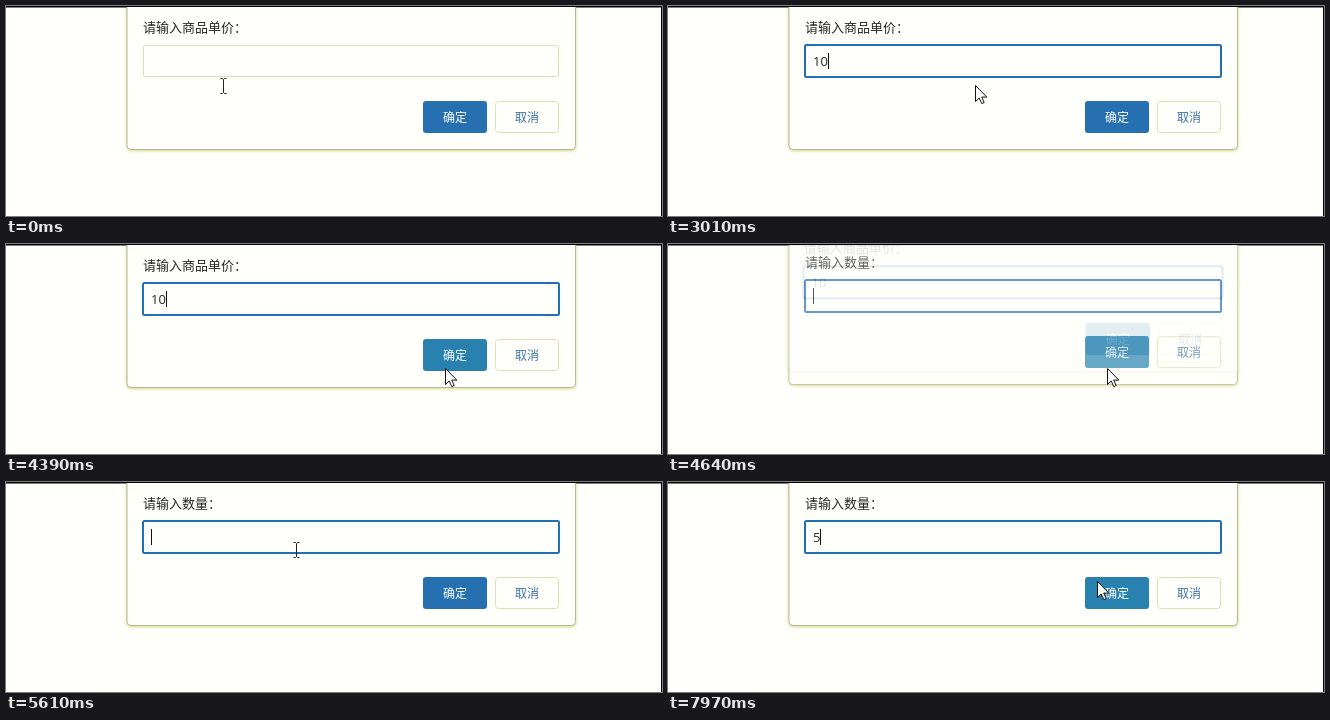
Write an HTML page that moves like this. It is 656 px wide and 210 px high and loops after 8000 ms.

```html
<!DOCTYPE html>
<html lang="zh-CN">
<head>
<meta charset="utf-8">
<title>Prompt dialogs</title>
<style>
  html, body { margin: 0; width: 100%; height: 100%; overflow: hidden; background: #fffffc; }
  svg { display: block; }
  text { font-family: "Noto Sans CJK SC", "Noto Sans CJK", sans-serif; font-size: 13px; fill: #262622; }
  text.value { font-family: "Open Sans", "Noto Sans", sans-serif; }
  text.label { font-size: 12px; text-anchor: middle; }
  .panel { fill: #fffffc; stroke: #b6b79c; filter: drop-shadow(0 1px 1.5px rgba(185, 185, 40, .6)); }
  .outline { fill: none; stroke: #dde0b4; }
  .ring { fill: none; stroke: #2270b4; stroke-width: 2; }
</style>
</head>
<body>
<svg width="656" height="210" viewBox="0 0 656 210">
  <rect width="656" height="1.5"/>
  <rect x="655" width="1" height="210"/>
  <g id="dialogs"></g>
  <rect width="656" height="1"/>
  <path id="arrow" d="M.5 .5V16.5L4.2 13L6.8 18.6L9.2 17.5L6.7 12.1H11.8Z" fill="#fff" stroke="#111"/>
  <path id="beam" d="M-3 .5H-1L0 1.5L1 .5H3M0 1.5V14.5M-3 15.5H-1L0 14.5L1 15.5H3" fill="none" stroke="#222"/>
</svg>
<script>
const LOOP = 8000, BLINK = 530;
const $ = id => document.getElementById(id);
const clamp = v => Math.max(0, Math.min(1, v));
const ramp = (t, from, to) => clamp((t - from) / (to - from));
const smooth = p => p * p * (3 - 2 * p);

// Pointer hot spot: time, x, y
const pointerPath = [
  [40, 217, 72], [240, 229, 64],
  [2600, 229, 64], [2800, 256, 68], [3010, 307, 79], [3380, 420, 112], [3700, 436, 121], [4000, 439, 124],
  [4900, 439, 124], [5060, 415, 115], [5340, 320, 76], [5560, 290, 60],
  [7160, 290, 60], [7400, 315, 67], [7700, 388, 88], [7930, 429, 99]
];

function pointerAt(t) {
  const next = pointerPath.findIndex(point => point[0] > t);
  if (next === 0) return pointerPath[0].slice(1);
  if (next < 0) return pointerPath.at(-1).slice(1);
  const [t0, x0, y0] = pointerPath[next - 1], [t1, x1, y1] = pointerPath[next];
  const p = (t - t0) / (t1 - t0);
  return [x0 + (x1 - x0) * p, y0 + (y1 - y0) * p];
}

function createDialog(title) {
  const group = document.createElementNS("http://www.w3.org/2000/svg", "g");
  group.innerHTML = `
    <path class="panel" d="M121 -30H569.5V139.5Q569.5 143.5 565.5 143.5H125Q121 143.5 121 139.5Z"/>
    <text x="137" y="26">${title}</text>
    <rect class="outline" x="137.5" y="39.5" width="415" height="31" rx="1"/>
    <rect class="ring" x="137" y="39" width="416" height="32" rx="1.5"/>
    <text class="value" x="145" y="60"></text>
    <rect class="caret" y="47" width="1" height="16" fill="#111"/>
    <rect class="ok" x="417" y="95" width="64" height="32" rx="3"/>
    <text class="label" x="449" y="116" style="fill:#fff">确定</text>
    <rect class="outline" x="489.5" y="95.5" width="63" height="31" rx="3"/>
    <text class="label" x="521" y="116" style="fill:#3b73a8">取消</text>`;
  // Later dialogs lie beneath the one being dismissed.
  $("dialogs").prepend(group);
  const part = name => group.querySelector("." + name);
  const ring = part("ring"), value = part("value"), caret = part("caret"), ok = part("ok");

  return state => {
    group.setAttribute("opacity", state.opacity);
    group.setAttribute("transform", `translate(345 ${state.shift}) scale(${state.scale}) translate(-345 0)`);
    ring.setAttribute("opacity", state.focus);
    if (value.textContent !== state.text) value.textContent = state.text;
    caret.setAttribute("x", 145 + Math.round(state.text.length * 7.45));
    caret.setAttribute("opacity", state.caret ? 1 : 0);
    ok.setAttribute("fill", state.hover ? "#2981b0" : "#2670b1");
  };
}

const drawPrice = createDialog("请输入商品单价：");
const drawCount = createDialog("请输入数量：");
const caretOn = (t, since) => t >= since && Math.floor((t - since) / BLINK) % 2 === 0;

function render(t) {
  const [x, y] = pointerAt(t);
  const hover = x >= 417 && x <= 481 && y >= 95 && y <= 127;
  const inField = y <= 72;
  const leave = ramp(t, 4440, 4700), enter = ramp(t, 4480, 4740);

  drawPrice({
    opacity: 1 - smooth(leave),
    shift: -22 * leave,
    scale: 1 + .01 * leave,
    focus: ramp(t, 450, 570),
    text: t < 1790 ? "" : t < 1870 ? "1" : "10",
    caret: t < 1790 ? caretOn(t, 490) : t < 1908 || caretOn(t, 1908),
    hover
  });
  drawCount({
    opacity: smooth(clamp(enter * 1.15)),
    shift: -20 * (1 - enter) ** 2,
    scale: 1,
    focus: 1,
    text: t < 6870 ? "" : "5",
    caret: t < 4550 || caretOn(t, t < 6870 ? 4550 : 6870),
    hover
  });

  const place = `translate(${Math.round(x)} ${Math.round(y)})`;
  $("arrow").setAttribute("transform", place);
  $("beam").setAttribute("transform", `${place} translate(.5 0)`);
  $("arrow").setAttribute("opacity", inField ? 0 : 1);
  $("beam").setAttribute("opacity", inField ? 1 : 0);
}

const start = performance.now();
function tick() {
  render((performance.now() - start) % LOOP);
  requestAnimationFrame(tick);
}
tick();
</script>
</body>
</html>
```
